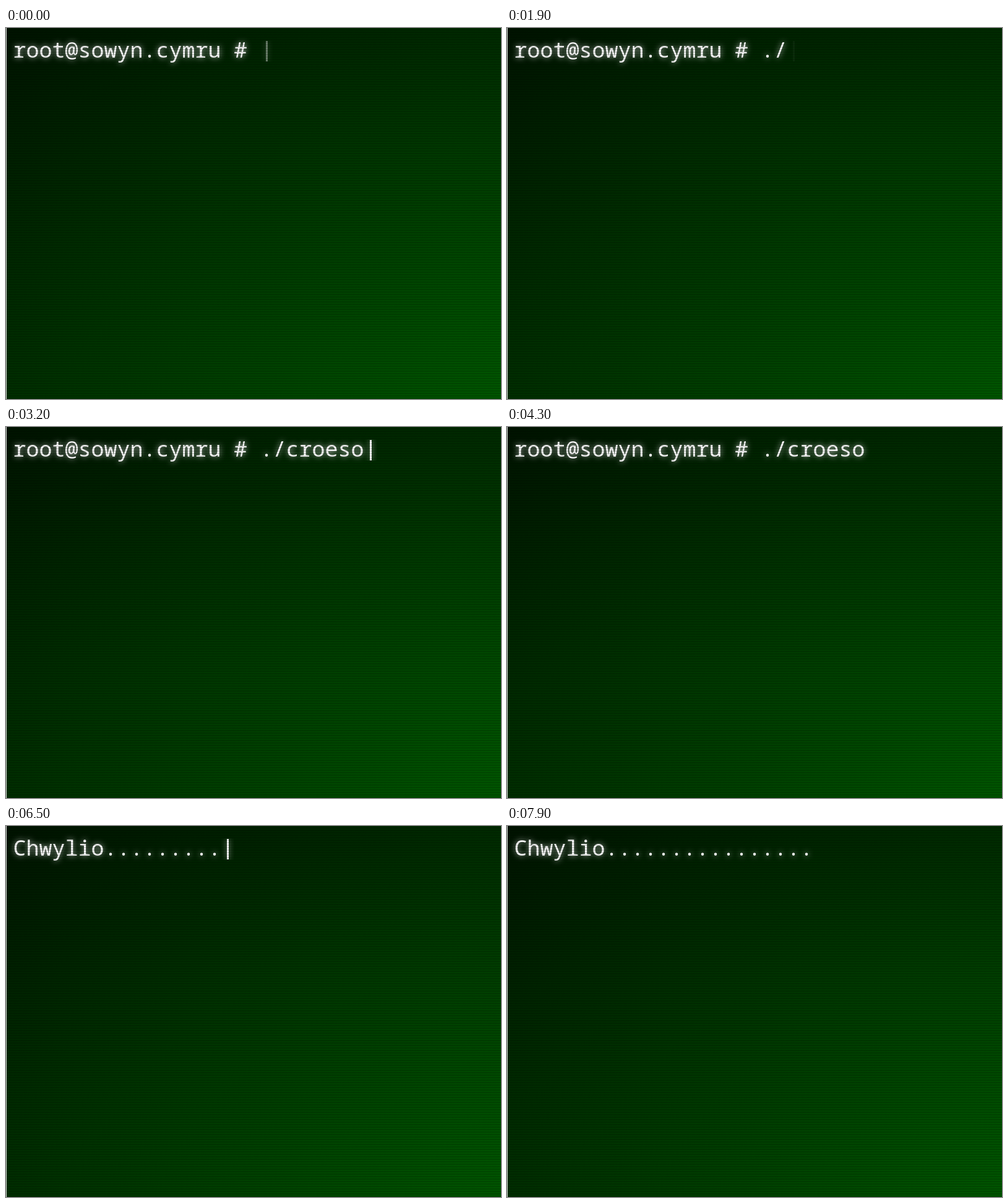
Animation, 800 px wide and 600 px high, one loop 8000 ms. Source, as an HTML page:

```html
<!DOCTYPE html>
<html lang="cy">
<head>
<meta charset="utf-8">
<title>Terminal</title>
<style>
html, body { margin: 0; width: 100%; height: 100%; overflow: hidden; background: #000; }
#stage {
  position: relative; width: 800px; height: 600px; overflow: hidden;
  background: radial-gradient(2172px 1222px at 1280px 720px, rgba(0,150,0,.75), #000) #000;
}
#stage::after {
  content: ""; position: absolute; inset: 0;
  background: repeating-linear-gradient(0deg, rgba(0,0,0,.15) 0 2px, transparent 2px 4px);
}
#stage::before {
  content: ""; position: absolute; z-index: 1; left: 0; top: 0;
  width: 1px; height: 100%; background: #d8e0d8;
}
#line {
  position: absolute; left: 11.5px; top: 11px; white-space: pre; color: #fff;
  font: 35px/48px "Noto Sans Mono", "DejaVu Sans Mono", monospace;
  text-shadow: 0 0 10px #c8c8c8;
}
#cursor {
  position: absolute; top: 21px; width: 3px; height: 33px; background: #fff;
  box-shadow: 0 0 10px rgba(200,200,200,.8); clip-path: inset(-1px -9px);
}
</style>
</head>
<body>
<div id="stage"><div id="line"></div><div id="cursor"></div></div>
<script>
const LOOP = 8000, STEP = 100, BLINK = 700, CELL = 21, LEFT = 11.5;
const PROMPT = "root@sowyn.cymru # ", COMMAND = "./croeso ";
const SCAN = "Chwylio" + ".".repeat(16);
const KEYS = [1000, 1700, 2200, 2300, 2400, 2500, 3000, 3200, 3300];
const FADE = 4930, FADE_TIME = 250, SCAN_START = 5500;

const line = document.getElementById("line");
const cursor = document.getElementById("cursor");
const within = (t, a, b) => t >= a && t <= b;

function typed(t) {
  if (t < SCAN_START) return PROMPT + COMMAND.slice(0, KEYS.filter(k => k <= t).length);
  if (t < 5800) return SCAN.slice(0, 4);
  if (t < 6000) return SCAN.slice(0, 9);
  return SCAN.slice(0, Math.floor(16.4 + (t - 6500) * 0.012));
}

// The cursor stays lit during quick typing and pulses in the pauses.
function glow(t) {
  if (within(t, 2200, 2500) || within(t, 3000, 3300) || within(t, SCAN_START, 7100)) return 1;
  const start = t < 2200 ? 195 : t < 3000 ? 2500 : t < SCAN_START ? 3250 : 6850;
  return (1 + Math.cos(2 * Math.PI * (t - start) / BLINK)) / 2;
}

function draw(now) {
  const t = Math.floor(now % LOOP / STEP) * STEP;
  const text = typed(t);
  const fade = t < FADE || t >= SCAN_START ? 1 : Math.max(0, 1 - (t - FADE) / FADE_TIME);
  line.textContent = text;
  line.style.opacity = fade;
  cursor.style.left = LEFT + CELL * (text.length + 0.5) - 1.5 + "px";
  cursor.style.opacity = glow(t) * fade;
}

const begin = performance.now();
function tick() {
  draw(performance.now() - begin);
  requestAnimationFrame(tick);
}
tick();
</script>
</body>
</html>
```
